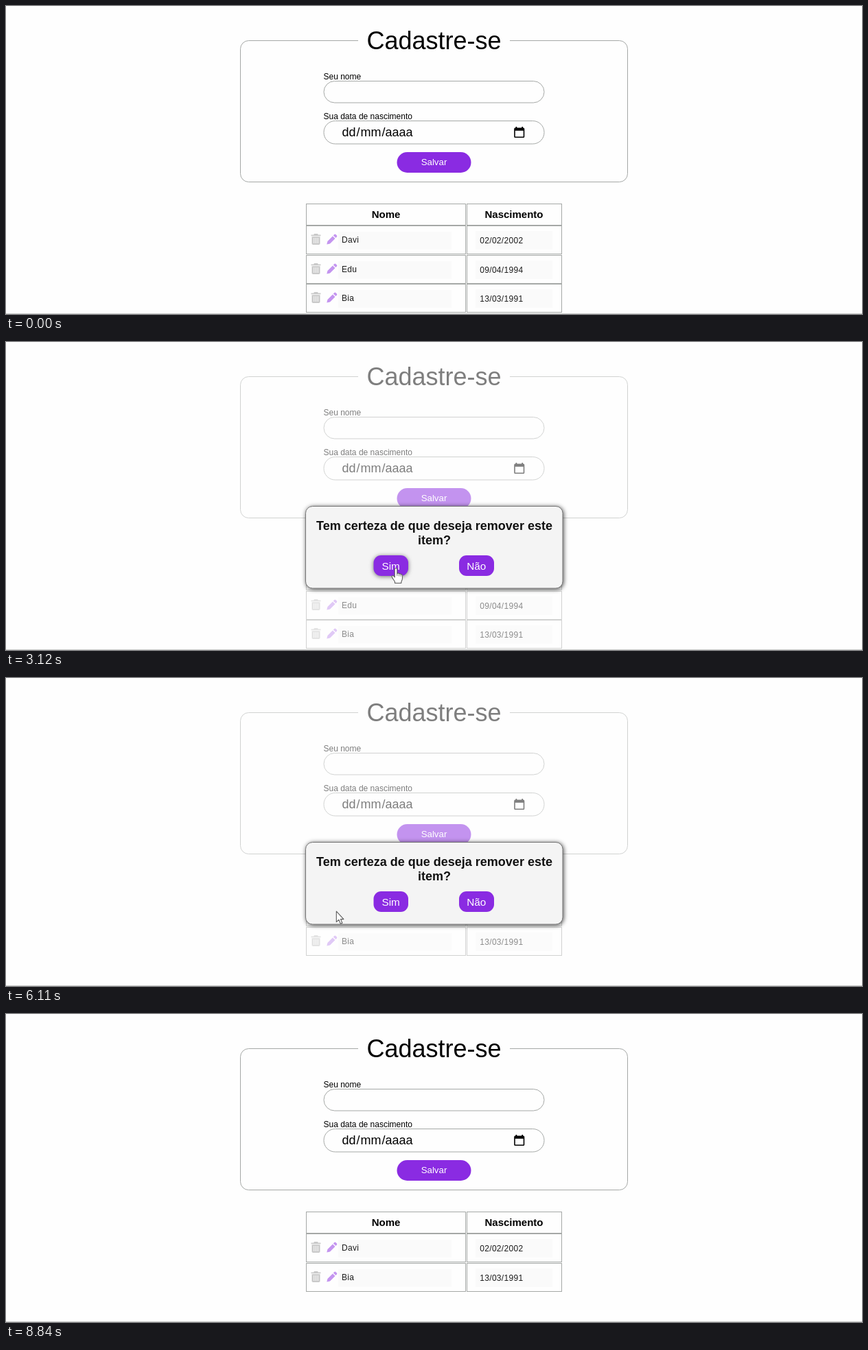
These frames come from a looping animation (1247 by 449 pixels, 9.36 s). An HTML page:

```html
<!DOCTYPE html>
<html lang="pt-BR">
<head>
<meta charset="utf-8">
<title>Cadastre-se</title>
<style>
html, body { margin: 0; width: 100%; height: 100%; overflow: hidden; background: #fefefe; }
svg { display: block; width: 1247px; height: 449px; font-family: "Liberation Sans", Arial, sans-serif; }
.line { fill: none; stroke: #a5a8a6; }
.label { font-size: 12px; }
.date { font-size: 18px; }
.head { font-size: 15px; font-weight: bold; text-anchor: middle; }
.cell { font-size: 12px; letter-spacing: .3px; fill: #1c1c1c; }
.field { fill: #fafafa; }
.pen { fill: #c495f0; }
.main { fill: #8a2be2; }
.btn { fill: #fff; text-anchor: middle; }
.ask { font-size: 18px; font-weight: bold; text-anchor: middle; fill: #111; }
.hover { filter: drop-shadow(0 1px 3px rgba(0,0,0,.55)); }
.cursor { fill: #fff; stroke: #5c5c5c; stroke-width: 1.1; stroke-linejoin: round; }
</style>
</head>
<body>
<svg viewBox="0 0 1247 449">
  <defs>
    <path id="trash" fill-rule="evenodd" d="M4.5 0h5l.8 1.4H14V3.3H0V1.4H3.7ZM1 4.3H13V14.2q0 1.8-1.8 1.8H2.8Q1 16 1 14.2ZM3.7 6v8h1.1V6ZM6.5 6v8h1.1V6ZM9.3 6v8h1.1V6Z"/>
    <path id="pencil" d="M1.1 10.4 8.6 2.9 12.2 6.5 4.7 14 0 15ZM9.5 2 11 .5Q12 -.4 13 .5L14.6 2.1Q15.5 3 14.6 4.1L13.1 5.6Z"/>
  </defs>
  <g id="page">
    <path class="line" d="M513 50.5H353.5a12 12 0 0 0-12 12V244.5a12 12 0 0 0 12 12H893.5a12 12 0 0 0 12-12V62.5a12 12 0 0 0-12-12H734"/>
    <text x="623.5" y="63" font-size="36" text-anchor="middle">Cadastre-se</text>
    <text class="label" x="462.5" y="106.5">Seu nome</text>
    <rect class="line" x="463" y="109.5" width="321" height="31.5" rx="15.7"/>
    <text class="label" x="462.5" y="164.5">Sua data de nascimento</text>
    <rect class="line" x="463" y="167.5" width="321" height="33.5" rx="16.5"/>
    <text class="date" x="489.5" y="190">dd</text>
    <text class="date" x="510.5" y="190">/</text>
    <text class="date" x="516.5" y="190">mm</text>
    <text class="date" x="547.5" y="190">/</text>
    <text class="date" x="552.5" y="190">aaaa</text>
    <path fill-rule="evenodd" d="M742.5 176h1.8v1.6h7V176h1.8v1.6h.6q1.6 0 1.6 1.6V190.4q0 1.6-1.6 1.6H741.8q-1.6 0-1.6-1.6V179.200q0-1.6 1.6-1.6h.7ZM741.8 181.700V190.400H753.700V181.700Z"/>
    <rect class="main" x="569.5" y="213" width="108" height="30" rx="15"/>
    <text class="btn" x="623.500" y="232.300" font-size="13.3">Salvar</text>
    <rect class="line" x="437.5" y="288.500" width="232" height="31"/>
    <rect class="line" x="671.5" y="288.500" width="138" height="31"/>
    <text class="head" x="553.5" y="308.500">Nome</text>
    <text class="head" x="740" y="308.500">Nascimento</text>
    <g id="rows"></g>
  </g>
  <path d="M0 448.500H1247" stroke="#c9cbca"/>
  <g id="modal">
    <rect x="436.500" y="239.500" width="374.500" height="119.500" rx="10" fill="#f4f4f4" stroke="#777" style="filter:drop-shadow(1px 1px 3px rgba(0,0,0,.7))"/>
    <text class="ask" x="624" y="274">Tem certeza de que deseja remover este</text>
    <text class="ask" x="624" y="295">item?</text>
    <rect id="yes" class="main" x="535.500" y="311" width="50.500" height="30" rx="11"/>
    <text class="btn" x="560.700" y="331.500" font-size="15.300">Sim</text>
    <rect id="no" class="main" x="660" y="311" width="51" height="30" rx="11"/>
    <text class="btn" x="685.300" y="331.500" font-size="15.300">Não</text>
  </g>
  <g id="cursor" class="cursor">
    <path id="arrow" d="M0 0V15.500L3.600 12.200 6 18 8.600 17 6.200 11.400H10.600Z"/>
    <g id="hand">
      <path d="M-1.800 1.500C-1.800-.8 1.800-.8 1.800 1.500V8c.3-1.400 2.600-1.200 2.800.3.5-1 2.400-.8 2.600.8.6-.8 2.200-.3 2.200 1.200V15c0 2-1.200 3.200-1.600 4.500v2H-1.500v-2C-2.500 17.500-5.800 14-5.800 11.800c0-1.600 2-1.600 2.800-.4L-1.800 13Z"/>
      <path d="M1.800 8v3M4.600 8.500v3M7.200 9.300v2.500" fill="none" stroke-width=".8"/>
    </g>
  </g>
</svg>
<script>
const LOOP = 9360, TICK = 130;
const REMOVED = 3380;
const ASKING = [[1820, 3380], [5850, 7410]];
const TOPS = [320.5, 363.5, 405.5];
const people = [["Davi", "02/02/2002"], ["Edu", "09/04/1994"], ["Bia", "13/03/1991"]];

// Pointer stops: time, x, y
const stops = [
  [130, 330, 426], [1170, 454, 381], [1820, 454, 381], [2860, 568, 330],
  [3900, 568, 330], [4030, 560, 328], [5200, 452, 342], [5850, 452, 342],
  [7020, 684, 328], [7540, 684, 328], [8450, 132, 431]
];
const GONE = 8580;

const $ = id => document.getElementById(id);
const show = (el, on) => el.setAttribute("visibility", on ? "visible" : "hidden");
const inside = (p, x, y, w, h) => p && p.x >= x && p.x <= x + w && p.y >= y && p.y <= y + h;

$("rows").innerHTML = people.map(([name, born]) => `<g>
  <rect class="line" x="437.5" y="0" width="232" height="41"/>
  <rect class="line" x="671.5" y="0" width="138" height="41"/>
  <rect class="field" x="484" y="8.500" width="165" height="25.500"/>
  <rect class="field" x="684" y="7.500" width="112" height="27"/>
  <use href="#trash" x="444.500" y="11.500"/>
  <use class="pen" href="#pencil" x="467.300" y="12"/>
  <text class="cell" x="489" y="24.500">${name}</text>
  <text class="cell" x="690.300" y="25">${born}</text></g>`).join("");
const rows = [...$("rows").children];

function pointer(t) {
  if (t < stops[0][0] || t >= GONE) return null;
  const i = stops.findIndex(s => s[0] > t);
  if (i < 0) return { x: stops.at(-1)[1], y: stops.at(-1)[2] };
  const [t0, x0, y0] = stops[i - 1], [t1, x1, y1] = stops[i];
  const u = (t - t0) / (t1 - t0), k = u * u * (3 - 2 * u);
  return { x: x0 + (x1 - x0) * k, y: y0 + (y1 - y0) * k };
}

function draw(time) {
  const t = Math.floor((time % LOOP) / TICK) * TICK;
  const p = pointer(t);
  const asking = ASKING.some(([a, b]) => t >= a && t < b);
  const listed = t < REMOVED ? [0, 1, 2] : [0, 2];
  let link = false;

  $("page").setAttribute("opacity", asking ? .5 : 1);
  show($("modal"), asking);

  rows.forEach((row, i) => {
    const place = listed.indexOf(i);
    row.setAttribute("display", place < 0 ? "none" : "inline");
    if (place < 0) return;
    const top = TOPS[place];
    const onTrash = !asking && inside(p, 444, top + 11, 15, 18);
    const onPen = !asking && inside(p, 467, top + 11, 16, 18);
    row.setAttribute("transform", `translate(0 ${top})`);
    row.querySelector("use").setAttribute("fill", onTrash ? "#757575" : "#c9c9c9");
    link = link || onTrash || onPen;
  });

  for (const [id, x] of [["yes", 535], ["no", 660]]) {
    const over = asking && inside(p, x, 311, 51, 30);
    $(id).classList.toggle("hover", over);
    link = link || over;
  }

  $("cursor").setAttribute("display", p ? "inline" : "none");
  if (p) {
    $("cursor").setAttribute("transform", `translate(${p.x.toFixed(1)} ${p.y.toFixed(1)})`);
    $("arrow").setAttribute("display", link ? "none" : "inline");
    $("hand").setAttribute("display", link ? "inline" : "none");
  }
}

const start = performance.now();
function tick() {
  draw(performance.now() - start);
  requestAnimationFrame(tick);
}
tick();
</script>
</body>
</html>
```
